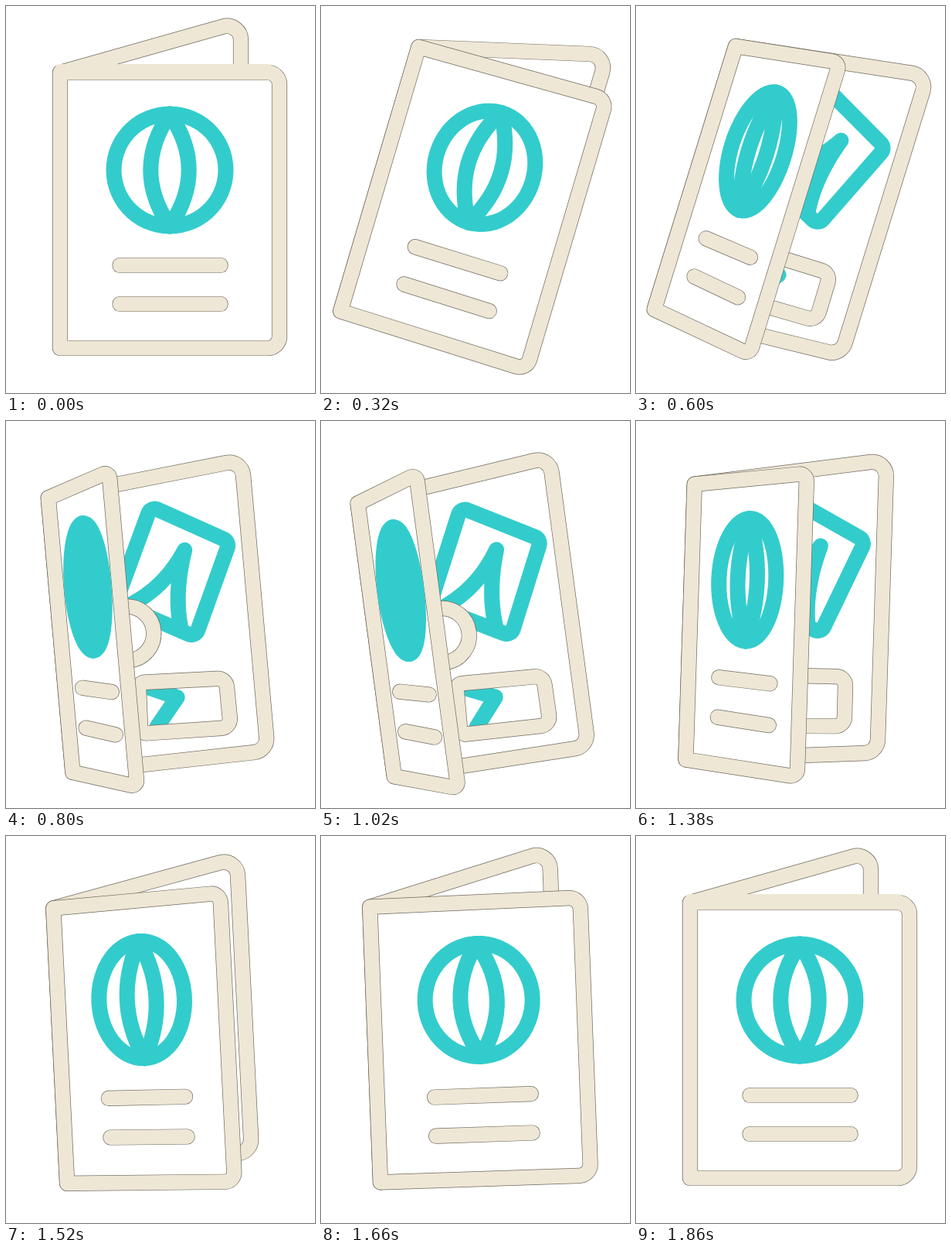
Recreate the animation shown at these times as an HTML page with a canvas. Size 400x500 px, loop 2400 ms.

```html
<!DOCTYPE html>
<html>
<head>
<meta charset="utf-8">
<style>
html, body { margin: 0; width: 100%; height: 100%; overflow: hidden; background: #fff; }
canvas { display: block; }
</style>
</head>
<body>
<canvas id="stage" width="400" height="500"></canvas>
<script>
const ctx = document.getElementById('stage').getContext('2d');
const BEIGE = '#eee7d5', TEAL = '#33cccc', EDGE = '#6e6a60';
const LOOP = 2400, STEP = 20;

// Damped swing of the whole booklet: time in ms, angle in degrees
const swing = [[0, 0], [320, 16.5], [490, 24], [560, 22], [600, 17.2], [800, -5.1],
  [920, -12], [1230, 5.9], [1550, -3.1], [1860, 0], [2400, 0]];

const ease = (t, a, b) => {
  const u = Math.min(1, Math.max(0, (t - a) / (b - a)));
  return u * u * (3 - 2 * u);
};

// Slope at a key; zero at turning points
function slope(i) {
  const a = swing[i - 1], b = swing[i], c = swing[i + 1];
  if (!a || !c || (b[1] - a[1]) * (c[1] - b[1]) <= 0) return 0;
  return (c[1] - a[1]) / (c[0] - a[0]);
}

function tilt(t) {
  const i = swing.findIndex((k, n) => n && t < k[0]) - 1;
  const [t0, a] = swing[i], [t1, b] = swing[i + 1];
  const h = t1 - t0, u = (t - t0) / h, v = 1 - u;
  return a + (b - a) * u * u * (3 - 2 * u) + h * u * v * (v * slope(i) - u * slope(i + 1));
}

const mix = (p, q, u) => [p[0] + (q[0] - p[0]) * u, p[1] + (q[1] - p[1]) * u];

// Maps unit coordinates onto a quad given as TL, TR, BR, BL
const mapper = ([tl, tr, br, bl]) => ([a, b]) => mix(mix(tl, tr, a), mix(bl, br, a), b);

const sample = (n, f) => Array.from({ length: n + 1 }, (_, i) => f(i / n));
const quad = (p, c, q) => sample(16, u => mix(mix(p, c, u), mix(c, q, u), u));

function trace(pts) {
  ctx.beginPath();
  pts.forEach(p => ctx.lineTo(...p));
}

function traceRounded(pts, radii) {
  const n = pts.length;
  ctx.beginPath();
  ctx.moveTo(...mix(pts[n - 1], pts[0], 0.5));
  pts.forEach((p, i) => ctx.arcTo(...p, ...pts[(i + 1) % n], radii[i]));
  ctx.closePath();
}

function ink(color, width) {
  ctx.strokeStyle = color;
  ctx.lineWidth = width;
  ctx.stroke();
}

function fillWhite() {
  ctx.fillStyle = '#fff';
  ctx.fill();
}

function beige() {
  ink(EDGE, 20.2);
  ink(BEIGE, 18.8);
}

const teal = () => ink(TEAL, 20);

function drawPage(open) {
  const x = 304 + 20 * open;
  const tl = [70, 86], bl = [70, 442], tr = [x, 20 + 39.5 * open], br = [x, 400 + 37 * open];
  traceRounded([tl, tr, br, bl], [0, 18, 18, 0]);
  fillWhite();
  beige();

  const at = mapper([tl, tr, [x, tr[1] + 356], bl]);
  traceRounded([[.517, .103], [.901, .285], [.684, .602], [.2945, .422]].map(at), [9, 9, 9, 9]);
  teal();

  const tip = [.669, .283];
  trace([...quad([.3665, .441], [.553, .402], tip), ...quad(tip, [.591, .435], [.616, .571])].map(at));
  teal();

  ctx.beginPath();
  ctx.arc(...at([.337, .541]), 35, 0, 2 * Math.PI);
  fillWhite();
  beige();

  trace([[.408, .744], [.565, .805], [.45, .8955]].map(at));
  teal();
  traceRounded([[.375, .725], [.821, .771], [.823, .951], [.3625, .909]].map(at), [8, 12, 12, 8]);
  beige();
}

function drawCover(open) {
  const x = 354 - 204 * open, top = 86 - 27 * open, bottom = 442 + 26 * open;
  const at = mapper([[70, 86], [x, top], [x, bottom], [70, 442]]), r = 15 - 9 * open;
  traceRounded([[70, 86], [x, top], [x, bottom], [70, 442]], [0, r, r, 0]);
  fillWhite();
  beige();
  if (!open) {
    // Closed, the cover's top edge blends into the page behind it
    trace([[70, 82], [339, 82]]);
    ink(BEIGE, 14);
  }

  // Globe: outer ring and two meridians, growing taller as the cover opens
  const cy = .354 - .007 * open, ry = .2036 * (1 + .06 * open);
  trace(sample(60, u => {
    const a = u * 2 * Math.PI;
    return at([.5 + .2553 * Math.cos(a), cy + ry * Math.sin(a)]);
  }));
  teal();
  for (const side of [-1, 1]) {
    trace(quad([.5, cy - ry], [.5 + side * .174, cy], [.5, cy + ry]).map(at));
    teal();
  }

  for (const y of [.6994, .8399]) {
    trace([at([.273, y - .009 * open]), at([.731, y + .002 * open])]);
    beige();
  }
}

function draw(now) {
  const t = Math.floor((now % LOOP) / STEP) * STEP;
  const open = ease(t, 150, 833) - ease(t, 1160, 1745);
  ctx.clearRect(0, 0, 400, 500);
  ctx.lineJoin = ctx.lineCap = 'round';
  ctx.save();
  ctx.translate(212, 264);
  ctx.rotate(tilt(t) * Math.PI / 180);
  ctx.translate(-212, -264);
  drawPage(open);
  drawCover(open);
  ctx.restore();
}

const start = performance.now();
function frame() {
  draw(performance.now() - start);
  requestAnimationFrame(frame);
}
frame();
</script>
</body>
</html>
```
